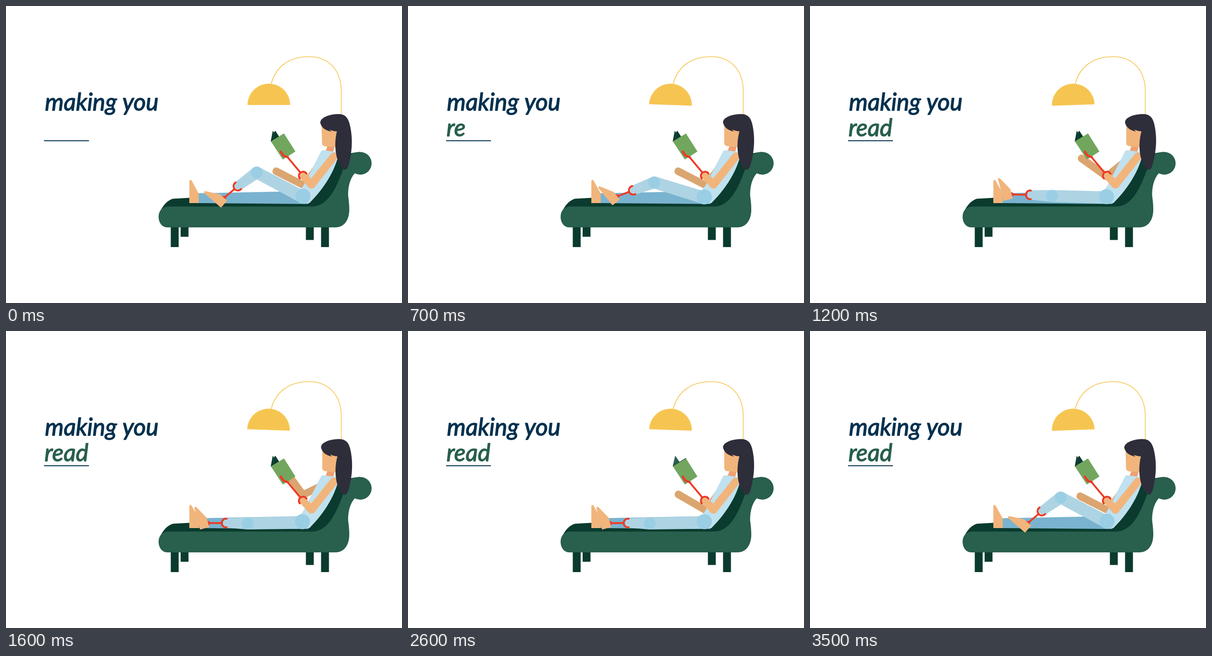
Recreate the animation shown at these times as an HTML page with a canvas. Size 864 by 648 pixels, loop 3.6 s.

```html
<!DOCTYPE html>
<html lang="en">
<head>
<meta charset="utf-8">
<title>making you read</title>
<style>
html, body { margin: 0; width: 100%; height: 100%; overflow: hidden; background: #fff; }
canvas { display: block; width: 864px; height: 648px; }
</style>
</head>
<body>
<canvas id="stage" width="864" height="648"></canvas>
<script>
const ctx = document.getElementById('stage').getContext('2d');
const LOOP = 3600, STEP = 100;
const C = {
  navy: '#04314f', green: '#285f4d', dark: '#0a3b2e', page: '#2f5b50', book: '#72a65e',
  yellow: '#f6c551', skin: '#f1b57c', shade: '#dba570', neck: '#f0a071', hair: '#2e2d3a',
  shirt: '#c0e1ef', leg: '#aed4e3', joint: '#9acee4', backLeg: '#7ab3cf', red: '#ee3a26'
};

// Leg poses: hip, knee, cup, ankle, foot angle in degrees
const UP = [648, 415, 547, 363.5, 506, 393, 475.5, 419, -49];
const NEARLY_UP = [648.5, 416, 545, 367, 505, 397, 474, 422.5, -51];
const HALF = [646.5, 416.5, 537.5, 385, 491.5, 402, 456, 415.5, -39];
const LOW = [647, 416, 528, 414.5, 480.5, 412, 439.7, 411.3, -15];
const FLAT = [646.5, 416, 527.5, 420, 480, 419, 440.5, 419.3, -15];
const RISING = HALF.map((v, i) => (v + NEARLY_UP[i]) / 2);
const LEG = [[300, UP], [400, NEARLY_UP], [700, HALF], [1200, LOW], [1300, FLAT], [2600, FLAT],
  [2700, LOW], [2800, HALF], [2900, RISING], [3000, RISING], [3100, NEARLY_UP],
  [3200, NEARLY_UP], [3500, UP]];

// Far arm poses: elbow, hand
const REST = [651, 392, 589.5, 360.5], RAISED = [647, 372, 592.5, 332.5], TURN = [648, 357.5, 621, 321];
const ARM = [[700, REST], [1200, RAISED], [1600, TURN], [2100, TURN], [2300, RAISED],
  [2600, [651, 392, 590, 356.5]], [2800, REST]];

const TOES = [[1700, [0]], [2000, [-7]], [2100, [-7]], [2500, [0]]];
const LAMP = [[0, 0], [400, 2], [900, -2], [1400, 2], [1800, 0], [2300, 2], [2800, -2], [3100, 2], [3400, -2]];
const TYPING = [500, 700, 900, 1100];

function track(keys, t) {
  const i = keys.findIndex(k => k[0] >= t);
  if (i === 0) return keys[0][1];
  if (i < 0) return keys[keys.length - 1][1];
  const [t0, a] = keys[i - 1], [t1, b] = keys[i];
  const u = (t - t0) / (t1 - t0);
  return a.map((v, n) => v + (b[n] - v) * u);
}
const hold = (keys, t) => keys.filter(k => k[0] <= t).pop()[1];

function shape(d, color) {
  ctx.fillStyle = color;
  ctx.fill(new Path2D(d));
}
function line(d, color, width, cap = 'round') {
  ctx.strokeStyle = color;
  ctx.lineWidth = width;
  ctx.lineCap = cap;
  ctx.lineJoin = 'round';
  ctx.stroke(new Path2D(d));
}
function disc(x, y, r, color) {
  ctx.fillStyle = color;
  ctx.beginPath();
  ctx.arc(x, y, r, 0, Math.PI * 2);
  ctx.fill();
}
function cup(x, y, r, angle, spread) {
  ctx.strokeStyle = C.red;
  ctx.lineWidth = 4;
  ctx.lineCap = 'round';
  ctx.beginPath();
  ctx.arc(x, y, r, angle - spread, angle + spread);
  ctx.stroke();
}
function limb(x0, y0, r0, x1, y1, r1, color) {
  const a = Math.atan2(y1 - y0, x1 - x0), nx = -Math.sin(a), ny = Math.cos(a);
  disc(x0, y0, r0, color);
  disc(x1, y1, r1, color);
  shape(`M${x0 + nx * r0},${y0 + ny * r0}L${x1 + nx * r1},${y1 + ny * r1}` +
    `L${x1 - nx * r1},${y1 - ny * r1}L${x0 - nx * r0},${y0 - ny * r0}Z`, color);
}
function turned(x, y, degrees, draw) {
  ctx.save();
  ctx.translate(x, y);
  ctx.rotate(degrees * Math.PI / 180);
  ctx.translate(-x, -y);
  draw();
  ctx.restore();
}

// The thin outline rounds the letter ends
function write(text, x, y, color) {
  ctx.font = 'italic 400 52px Lato, "Open Sans", sans-serif';
  ctx.fillStyle = ctx.strokeStyle = color;
  ctx.lineWidth = 1.5;
  ctx.lineJoin = 'round';
  ctx.fillText(text, x, y);
  ctx.strokeText(text, x, y);
}

function drawText(t) {
  write('making you', 85, 227.5, C.navy);
  write('read'.slice(0, TYPING.filter(k => k <= t).length), 84, 283.5, C.green);
  ctx.fillStyle = C.navy;
  ctx.fillRect(83, 293, 98, 2);
}

function drawLamp(t) {
  line('M578,172C588,132 618,110.5 661,110.5C706,110.5 731.5,142 731.5,186V245', C.yellow, 1.6, 'butt');
  turned(574, 193, hold(LAMP, t), () => shape('M527,216A46.5,46.5 0 0 1 620,216Z', C.yellow));
}

function drawCouch() {
  ctx.fillStyle = C.dark;
  for (const [x, h] of [[359.5, 43], [381, 20.5], [654.3, 27.5], [687.4, 43]])
    ctx.fillRect(x, 483, 17.2, h);
  shape('M335,452C341,436 352,424 364,420.5L660,404L722,335C735,325 752,320 772,318.5L760,352L722,430L670,440H345Z', C.dark);
  shape('M352,483C340,483 333,472 333,460C333,446 342,437.5 354,437.5H668C706,437 723,389 735,358' +
    'C741,338 748,324 758,321C763,319 768,318.5 773,318.5A24.7,24.7 0 0 1 773,368Q766,367.5 761,365' +
    'C750,377 746,396 746.5,414C748,424 749,434 749,444C749,468 737,483 719,483Z', C.green);
}

function drawBook(t) {
  const flipped = t >= 1700 && t < 2800;
  turned(604, 335, t >= 1700 && t < 2300 ? -1 : 0, () => {
    if (flipped) {
      shape('M577.5,295L583,272L593,286.5Z', C.page);
      shape('M577.5,295L606,277L608,281L580,297Z', C.dark);
    } else {
      shape('M577.5,296L582,272L584.5,276L587.5,272L596,285Z', C.dark);
      line('M583,291L585,276', C.page, 0.7);
    }
    shape('M578,295.5L606.5,278L631.5,317.5L604,335Z', C.book);
  });
}

function drawFoot(x, y) {
  shape(`M${x},${y + 3}Q${x + 1.5},${y - 2} ${x + 5},${y + 2}L${x + 20.5},${y + 30}V${y + 51}H${x}Z`, C.skin);
}

function drawFrontLeg(t) {
  const [hx, hy, kx, ky, cx, cy, ax, ay, foot] = track(LEG, t);
  const shin = Math.atan2(ky - cy, kx - cx), rod = Math.atan2(ay - cy, ax - cx);
  limb(hx, hy + 2, 13.5, kx, ky, 13, C.leg);
  limb(kx, ky, 13, cx + 4 * Math.cos(shin), cy + 4 * Math.sin(shin), 10.5, C.leg);
  disc(hx, hy, 16.5, C.joint);
  disc(kx, ky, 13, C.joint);
  cup(cx, cy, 9.5, rod, 1.72);
  line(`M${cx + 9 * Math.cos(rod)},${cy + 9 * Math.sin(rod)}L${ax},${ay}`, C.red, 4);
  disc(ax, ay, 4.8, C.red);
  turned(ax, ay, foot, () => drawFoot(ax - 20, ay - 42));
}

function drawBody(t) {
  const [ex, ey, px, py] = track(ARM, t);
  limb(690, 337, 8, ex, ey, 8, C.shade);
  limb(ex, ey, 8, px, py, 8.2, C.shade);
  drawBook(t);

  shape('M420,408.5L650,404L660,432L420,430Z', C.backLeg);
  turned(420, 430, track(TOES, t)[0], () => drawFoot(400, 379));

  shape('M702,304L717,307L713,322H695Z', C.neck);
  shape('M687,318Q689,314 694,315L718,318L723,334C712,370 689,403 662,430L648,431L638,408L650,390Z', C.shirt);
  drawFrontLeg(t);

  limb(715.5, 328, 8.6, 666.5, 389.5, 8.8, C.skin);
  limb(666.5, 389.5, 8.8, 648.5, 371, 7.8, C.skin);
  cup(648, 370.5, 9, 4.1, 1.65);
  line('M642,363L614,329.5', C.red, 4);
  line('M599.5,318L605.5,326.5L615,330', C.red, 5);
}

function drawHead(t) {
  turned(722, 320, t < 100 || t >= 3500 ? -1.4 : 0, () => {
    shape('M690,258L724,262L719,308L698,306Q690,305 690,299Z', C.skin);
    shape('M687.5,255C686,245 702,237 722,236C739,234.5 747,241 751,257C757,282 757,312 748,344' +
      'C745,358 738,361 732,353C719,336 715,305 723,273.5C717,273 713,272 707,269.5L711,274' +
      'C698,271 690,265 687.5,255Z', C.hair);
  });
}

function render(t) {
  ctx.fillStyle = '#fff';
  ctx.fillRect(0, 0, 864, 648);
  drawText(t);
  drawLamp(t);
  drawCouch();
  drawBody(t);
  drawHead(t);
}

const start = performance.now();
function tick() {
  const t = (performance.now() - start) % LOOP;
  render(Math.floor(t / STEP) * STEP);
  requestAnimationFrame(tick);
}
tick();
</script>
</body>
</html>
```
